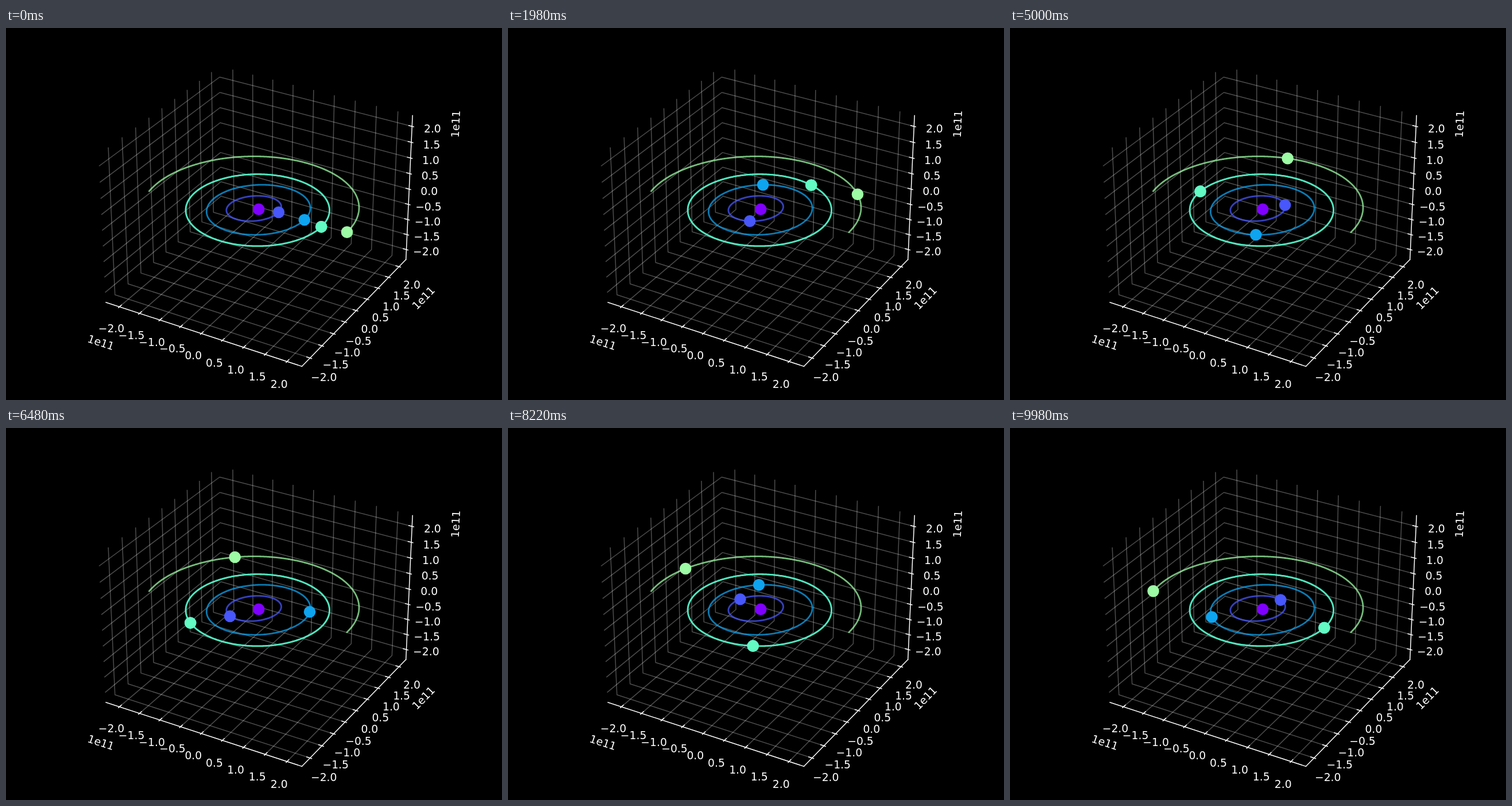
Recreate the animation shown at these times as an HTML page. Size 864 by 648 pixels, loop 10000 ms.

```html
<!DOCTYPE html>
<html lang="en">
<head>
<meta charset="utf-8">
<title>Orbits</title>
<style>
  html, body { margin: 0; width: 100%; height: 100%; overflow: hidden; background: #000; }
  svg { display: block; width: 864px; height: 648px; }
  text { font: 18.75px "DejaVu Sans", sans-serif; fill: #fff; }
  .grid, .axis, .orbit { fill: none; stroke-linejoin: round; }
  .grid { stroke: #fff; stroke-opacity: .3; stroke-width: 1.5; stroke-linecap: square; }
  .axis { stroke: #fff; stroke-width: 1.5; stroke-linecap: square; }
  .orbit { stroke-opacity: .75; stroke-width: 2.81; stroke-linecap: square; }
</style>
</head>
<body>
<svg id="stage" viewBox="0 0 864 648"></svg>
<script>
const stage = document.getElementById('stage');

// Perspective view: elevation 30 deg, azimuth -60 deg, distance 10
const H = 0.595243, V = 0.446432;      // half sizes of the plot box
const UNIT = H / 2.3375;               // box units per 1e11 m
const SQUASH = V / H;
const SCALE = 607.5 / 0.185, CX = 440.21, CY = 315.79;
const C30 = Math.sqrt(3) / 2;

function project([x, y, z]) {
  const side = C30 * x + 0.5 * y;
  const back = C30 * y - 0.5 * x;
  const f = SCALE / (10 + C30 * back - 0.5 * z);
  return [CX + side * f, CY - (0.5 * back + C30 * z) * f];
}

function add(tag, attrs, content) {
  const el = document.createElementNS('http://www.w3.org/2000/svg', tag);
  for (const k in attrs) el.setAttribute(k, attrs[k]);
  if (content) el.textContent = content;
  return stage.appendChild(el);
}

function line(cls, pts, attrs) {
  const points = pts.map(p => project(p).map(v => v.toFixed(2)).join()).join(' ');
  return add('polyline', { class: cls, points, ...attrs });
}

// Axes, grid, ticks and labels
const TICK = 0.16 * H;                 // base length for tick marks and label gaps
const NEAR = 0.8519, FAR = 1.8519;     // gaps of tick labels and exponents
const ticks = [-2, -1.5, -1, -0.5, 0, 0.5, 1, 1.5, 2];

const axes = [
  {
    at: (t, out = 0, down = 0) => [t, -H - out, -V - down],
    grid: t => [[t, -H, -V], [t, H, -V], [t, H, V]],
    half: H, end: -1, anchor: 'start'
  },
  {
    at: (t, out = 0, down = 0) => [H + out, t, -V - down],
    grid: t => [[H, t, -V], [-H, t, -V], [-H, t, V]],
    half: H, end: 1, anchor: 'end'
  },
  {
    at: (t, out = 0, across = 0) => [H + out, H + across / SQUASH, t],
    grid: t => [[H, H, t], [-H, H, t], [-H, -H, t]],
    half: V, end: 1, anchor: 'end'
  }
];

for (const { at, grid, half, end, anchor } of axes) {
  const pos = t => t * UNIT * half / H;
  const away = (t, gap) => project(at(t, gap * TICK, gap * TICK * SQUASH));

  for (const t of ticks) line('grid', grid(pos(t)));
  line('axis', [at(-half), at(half)]);
  for (const t of ticks) {
    line('axis', [at(pos(t), 0.1 * TICK), at(pos(t), -0.2 * TICK)]);
    const [x, y] = away(pos(t), NEAR);
    add('text', { x: x.toFixed(1), y: Math.round(y + 15), 'text-anchor': 'middle' },
      t.toFixed(1).replace('-', '\u2212'));
  }

  const [x, y] = away(end * half, FAR);
  const [x0, y0] = project(at(-half)), [x1, y1] = project(at(half));
  const turn = Math.atan2(y1 - y0, x1 - x0) * 180 / Math.PI;
  add('text', {
    x: -0.8, y: 5.4, 'text-anchor': anchor,
    transform: `translate(${x.toFixed(2)} ${y.toFixed(2)}) rotate(${turn.toFixed(2)})`
  }, '1e11');
}

// Kepler orbits from perihelion distance (m), top speed (m/s) and inclination (deg)
const GM = 1.32746e20, STEP = 63000, STEPS = 500;

function orbit(rp, speed, tilt) {
  const a = 1 / (2 / rp - speed * speed / GM);
  const e = 1 - rp / a;
  const b = a * Math.sqrt(1 - e * e);
  const rate = Math.sqrt(GM / a ** 3) * STEP;
  const i = tilt * Math.PI / 180, k = UNIT / 1e11;
  return n => {
    const M = n * rate;
    let E = M;
    for (let j = 0; j < 8; j++) E -= (E - e * Math.sin(E) - M) / (1 - e * Math.cos(E));
    const x = a * (Math.cos(E) - e) * k;
    return [x * Math.cos(i), b * Math.sin(E) * k, x * Math.sin(i) * SQUASH];
  };
}

function rainbow(v) {
  const c = [Math.abs(2 * v - 0.5), Math.sin(Math.PI * v), Math.cos(Math.PI * v / 2)];
  return `rgb(${c.map(s => Math.round(s * 255)).join()})`;
}

const earth = orbit(147.09e9, 30303, 0);
const bodies = [
  () => [0, 0, 0],
  orbit(46e9, 58980, 7),
  orbit(107.48e9, 35260, 3.39),
  earth,
  earth,                               // the Moon, too close to tell apart
  orbit(206.62e9, 26500, 1.85)
].map((place, i) => ({ place, color: rainbow(i / 9) }));

for (const { place, color } of bodies.slice(1)) {
  line('orbit', Array.from({ length: STEPS }, (_, n) => place(n + 1)), { stroke: color });
}
for (const body of bodies) body.dot = add('circle', { r: 10.3, fill: body.color });

function show(n) {
  for (const { place, dot } of bodies) {
    const [x, y] = project(place(n + 1));
    dot.setAttribute('cx', x.toFixed(2));
    dot.setAttribute('cy', y.toFixed(2));
  }
}

const start = performance.now();
function tick() {
  show(Math.floor((performance.now() - start) / 20) % STEPS);
  requestAnimationFrame(tick);
}
show(0);
requestAnimationFrame(tick);
</script>
</body>
</html>
```
